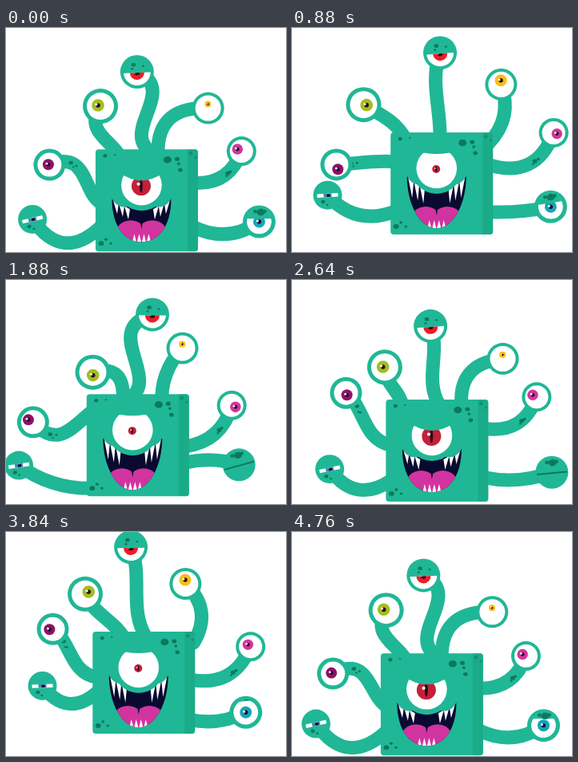
Recreate the animation shown at these times as an HTML page with a canvas. Size 350 by 281 pixels, loop 4800 ms.

```html
<!DOCTYPE html>
<html>
<head>
<meta charset="utf-8">
<style>
html, body { margin: 0; height: 100%; overflow: hidden; background: #fff; }
canvas { display: block; }
</style>
</head>
<body>
<canvas width="350" height="281"></canvas>
<script>
const ctx = document.querySelector('canvas').getContext('2d');
const TEAL = '#20b796', SHADE = '#1aab88', DARK = '#0b795e', NAVY = '#0a0a30', PINK = '#d2349f';
const PERIOD = 2400;

// Rises from 0 to 1 over a..b and falls back over c..d.
const clamp = v => Math.min(1, Math.max(0, v));
const pulse = (t, a, b, c, d) => clamp((t - a) / (b - a)) - clamp((t - c) / (d - c));

function dot(x, y, rx, color, ry = rx) {
  ctx.fillStyle = color;
  ctx.beginPath();
  ctx.ellipse(x, y, rx, ry, 0, 0, 7);
  ctx.fill();
}
const spot = (x, y, r) => dot(x, y, r, DARK, r * 0.85);

function poly(color, ...pts) {
  ctx.fillStyle = color;
  ctx.beginPath();
  for (let i = 0; i < pts.length; i += 2) ctx.lineTo(pts[i], pts[i + 1]);
  ctx.fill();
}

function iris(x, y, r, color) {
  dot(x, y, r, color);
  dot(x, y, r * 0.36, '#2b1020');
  dot(x - r * 0.28, y - r * 0.15, r * 0.2, '#fff');
}

// An arm runs from root to eye, bent sideways at one and two thirds of its length.
function limb({ root: [x0, y0], eye: [x3, y3], bend: [h1, h2 = h1], radius, tilt = 0, draw, marks = [] }) {
  const dx = x3 - x0, dy = y3 - y0, len = Math.hypot(dx, dy);
  const k1 = 3 * h1 - 1.5 * h2, k2 = 3 * h2 - 1.5 * h1;
  const nx = -dy / len, ny = dx / len;
  const xs = [x0, x0 + dx / 3 + nx * k1, x0 + dx * 2 / 3 + nx * k2, x3];
  const ys = [y0, y0 + dy / 3 + ny * k1, y0 + dy * 2 / 3 + ny * k2, y3];
  ctx.strokeStyle = TEAL;
  ctx.lineWidth = 17;
  ctx.lineCap = 'round';
  ctx.beginPath();
  ctx.moveTo(x0, y0);
  ctx.bezierCurveTo(xs[1], ys[1], xs[2], ys[2], x3, y3);
  ctx.stroke();
  const at = (p, u) => (1 - u) ** 3 * p[0] + 3 * u * (1 - u) ** 2 * p[1] + 3 * u * u * (1 - u) * p[2] + u ** 3 * p[3];
  for (const [u, size, shift] of marks) spot(at(xs, u), at(ys, u) + shift, size);
  dot(x3, y3, radius, TEAL);
  ctx.save();
  ctx.translate(x3, y3);
  ctx.rotate(tilt * Math.PI / 180);
  draw();
  ctx.restore();
}

function openEye(white, x, y, size, color) {
  dot(0, 0, white, '#fff');
  iris(x, y, size, color);
}

function redEye() {
  ctx.save();
  ctx.beginPath();
  ctx.rect(-20, 1, 40, 20);
  ctx.clip();
  openEye(17, 0, 1, 9, '#ee1c24');
  ctx.restore();
  spot(-4, -9, 2.8);
  spot(8, -7, 1.4);
  spot(-6, -4, 1.6);
}

function blueEye(open) {
  if (open > 0.02) {
    ctx.save();
    ctx.beginPath();
    ctx.arc(0, 0, 15.5, 0, 7);
    ctx.clip();
    openEye(15.5, 0, 0, 7.5, '#12a5bd');
    ctx.fillStyle = TEAL;
    ctx.fillRect(-20, -20, 40, 26 - 20 * open);
    ctx.restore();
  } else {
    ctx.fillStyle = DARK;
    ctx.fillRect(-19, 0, 38, 2);
  }
  ctx.save();
  ctx.beginPath();
  ctx.rect(-20, -21, 40, 21 - 15 * clamp(open * 2 - 1));
  ctx.clip();
  spot(2, -12, 5);
  spot(-5, -13, 2.5);
  spot(7, -13, 2.5);
  ctx.restore();
}

function sleepyEye() {
  ctx.fillStyle = '#fff';
  ctx.fillRect(-13, -2, 26, 4.5);
  ctx.fillStyle = '#4d83b0';
  ctx.fillRect(-5, -2, 10, 4.5);
  ctx.fillStyle = NAVY;
  ctx.fillRect(-1, -1, 4, 3);
  spot(-6, 8, 2.6);
  spot(-1, 12, 1.5);
}

function mouth(open) {
  const top = 62 - 7 * open, bottom = 116 + 4 * open;
  ctx.save();
  ctx.beginPath();
  ctx.moveTo(20.5, top);
  ctx.bezierCurveTo(20.5, top + 34, 36, bottom, 57.5, bottom);
  ctx.bezierCurveTo(79, bottom, 94.5, top + 34, 94.5, top);
  ctx.quadraticCurveTo(90, top + 8, 82, top + 10);
  ctx.lineTo(33, top + 10);
  ctx.quadraticCurveTo(25, top + 8, 20.5, top);
  ctx.fillStyle = NAVY;
  ctx.fill();
  ctx.clip();
  for (const x of [44, 71]) dot(x, bottom - 7, 20, PINK);
  poly(NAVY, 55.5, bottom - 27, 59.5, bottom - 27, 57.5, bottom - 16);
  for (let x = 45.5; x < 66; x += 6) poly('#fff', x, bottom + 2, x + 3, bottom - 10, x + 6, bottom + 2);
  for (const mirror of [x => x, x => 115 - x])
    for (const x of [22, 29, 36]) {
      const y = top + (x - 18) * 0.5;
      poly('#fff', mirror(x), y, mirror(x + 7), y + 4, mirror(x + 5), y + 17 + 8 * open);
    }
  ctx.restore();
}

function face(t) {
  const open = pulse(t, 400, 580, 2050, 2250);
  const size = 12 - 7 * pulse(t, 700, 860, 1950, 2150);
  mouth(open);
  dot(57.5, 45, 32, TEAL);
  dot(57.5, 45, 25.3, '#fff');
  dot(57, 46, size, '#c32039');
  dot(57, 46, size * 0.12 + 0.5, '#2b0a14', size * 0.7);
  dot(57 - size * 0.28, 46 - size * 0.2, size * 0.17, '#fff');
  const edge = 28 - 6 * open, dip = 50 - 18 * open;
  ctx.fillStyle = TEAL;
  ctx.beginPath();
  ctx.moveTo(28, 12);
  ctx.lineTo(28, edge);
  ctx.quadraticCurveTo(57.5, dip, 87, edge);
  ctx.lineTo(87, 12);
  ctx.fill();
}

function drawBody(x, y, t) {
  ctx.save();
  ctx.translate(x, y);
  ctx.beginPath();
  ctx.roundRect(0, 0, 128, 128, 4);
  ctx.fillStyle = TEAL;
  ctx.fill();
  ctx.clip();
  ctx.fillStyle = SHADE;
  ctx.fillRect(115, 0, 13, 128);
  face(t);
  for (const s of [[90, 13, 5], [102, 12, 3], [104, 18, 2], [106, 26, 2.8], [12, 8, 2.6], [24, 7, 1.2],
    [7, 118, 3.4], [13, 113, 2], [19, 118, 1.8]]) spot(...s);
  dot(119, 5, 2.4, '#13916f');
  dot(125, 10, 1.6, '#13916f');
  ctx.restore();
}

// Everything sways on one slow wave (c, s) and its double-speed overtone (c2, s2).
function frame(now) {
  const t = now % PERIOD, a = t / PERIOD * 2 * Math.PI;
  const c = Math.cos(a), s = Math.sin(a), c2 = Math.cos(2 * a), s2 = Math.sin(2 * a);
  const x = 113 - 2.4 * c + 11 * s + 1.3 * c2 - 0.6 * s2;
  const y = 139 + 14.8 * c + 0.9 * s - 1.6 * c2 - 1.1 * s2;
  const blueOpen = pulse(t, 740, 1000, 1600, 1700) +
    Math.max(pulse(t, 2060, 2200, 2310, 2490), pulse(t + PERIOD, 2060, 2200, 2310, 2490));

  ctx.fillStyle = '#fff';
  ctx.fillRect(0, 0, 350, 281);
  limb({
    root: [x + 63 + 13 * c2, y + 7],
    eye: [174.5 + 4.3 * c + 8.6 * s - 15 * c2 - 5.6 * s2, 40 + 20 * c + 5.5 * s - 5 * c2],
    bend: [-3 - 7 * c2, -4 + 15 * c2],
    radius: 21, tilt: -2.5 - 3 * s, draw: redEye
  });
  limb({
    root: [x + 30 - 16 * s, y + 8],
    eye: [104.2 + 13.1 * c - 3.6 * s + 0.7 * c2 + 3.2 * s2, 100.2 + 15.9 * c + 4.9 * s - 18 * c2 - 1.2 * s2],
    bend: [4 - 12 * c2, 2 - 16 * c2],
    radius: 22,
    draw: () => openEye(17, 1 - 4 * c, 0.3 + 1.6 * c - 3 * c2 - s2, 7.8, '#a3bd1f')
  });
  limb({
    root: [x + 106 - 24.5 * c + 7.3 * s - 3 * c2 + 6 * s2, y + 14],
    eye: [245 + 5.8 * c + 25.3 * s + 1.8 * c2 - 1.7 * s2, 82.3 + 19.5 * c + 2 * s - 1.2 * c2],
    bend: [-3 - 20 * c],
    radius: 20,
    draw: () => openEye(16, -0.3, -5, 4 + 3.5 * pulse(t, 300, 600, 1500, 1800), '#f9bd15')
  });
  limb({
    root: [x + 122, y + 49 - 3.7 * c - 15.3 * s - 3 * c2],
    eye: [305 - 13.2 * c + 18.2 * s + 2.5 * c2, 145.3 + 9.3 * c - 10.3 * s],
    bend: [15 - 3 * c + 3 * s],
    radius: 18.5, marks: [[0.6, 3, 1], [0.66, 2, 2], [0.57, 1.5, 3]],
    draw: () => openEye(14.5, -c - 4 * c2 - 3 * s2, -0.5 - 2 * c2 - 1.5 * s2, 6.7, PINK)
  });
  limb({
    root: [x + 122, y + 98 - 8.7 * c + s + 7.8 * c2 + 4 * s2],
    eye: [311.4 + 2.1 * c + 18.4 * s + 2.9 * c2, 232 + 9.3 * c + 1.7 * c2 + 1.3 * s2],
    bend: [3 + 8 * c2],
    radius: 20.5, tilt: -8 + 8 * c2, draw: () => blueEye(blueOpen)
  });
  limb({
    root: [x + 6, y + 45 + 22 * c2 + 6 * s2],
    eye: [53.5 - 3.2 * c + 12 * s + 4 * c2 + 8.7 * s2, 158 + 15.5 * c - 4.4 * s - 1.8 * c2 - 27 * s2],
    bend: [-5 + 14 * c2 - 8 * s2, -3 + 22 * c2 - 6 * s2],
    radius: 20, marks: [[0.75, 2.7, 0], [0.65, 1.6, 0], [0.71, 1.3, 4]],
    draw: () => openEye(15, -1.5 + 4.5 * s, 1.5 - 1.8 * c + 4.2 * s, 7, '#8e1169')
  });
  limb({
    root: [x + 7, y + 99 + 14.7 * c + 2 * s - 17 * c2 - 6 * s2],
    eye: [37.5 - 8.5 * c + 13 * s + 4 * c2 + 8 * s2, 221 + 26 * c + 2 * s - 7 * c2 - 4 * s2],
    bend: [-14.5 - 8 * c2],
    radius: 18, tilt: -7 - 6 * c, draw: sleepyEye
  });
  drawBody(x, y, t);
  requestAnimationFrame(frame);
}
requestAnimationFrame(frame);
</script>
</body>
</html>
```
